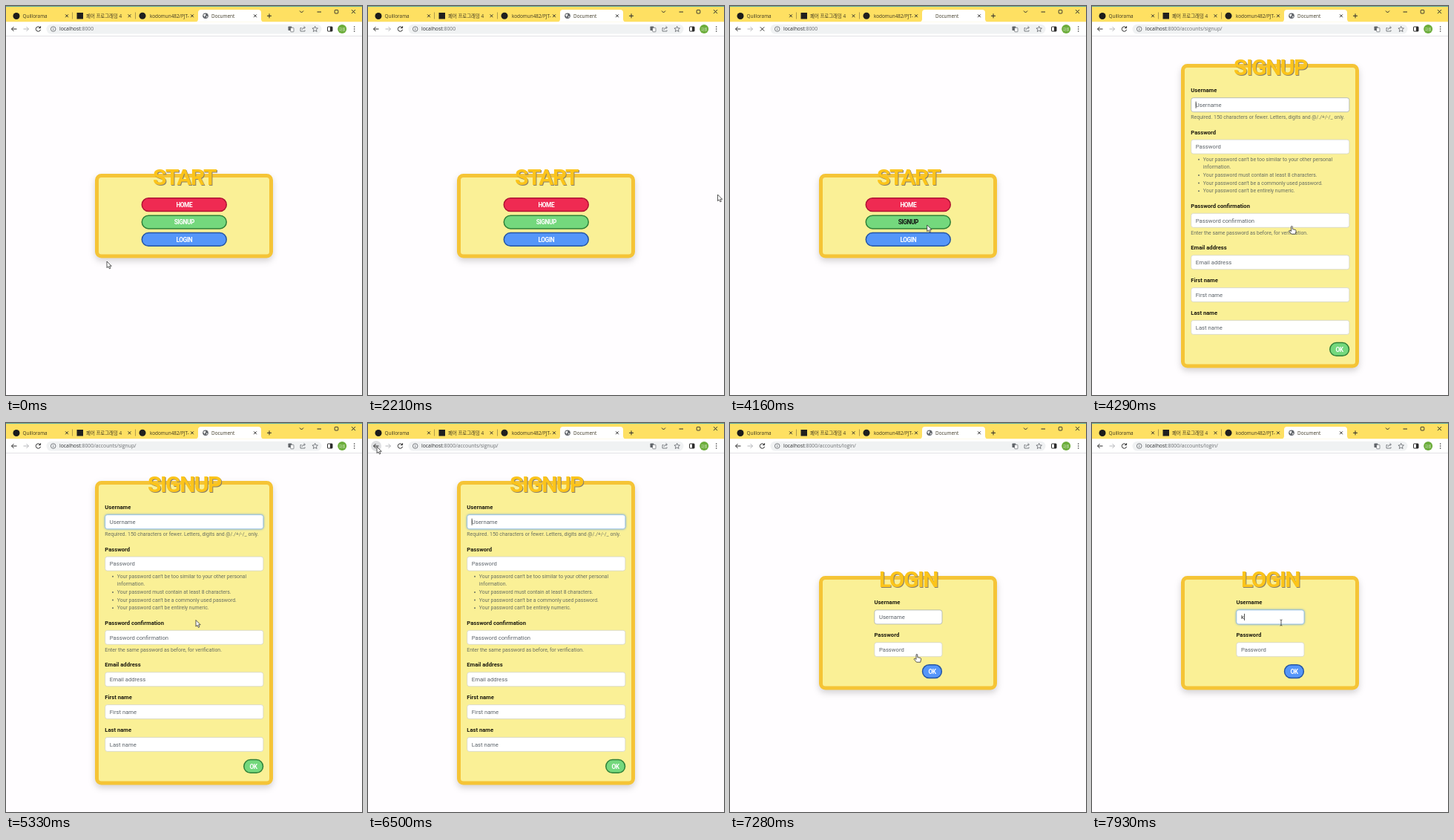
These frames come from a looping animation (480x524 px, 8000 ms). An HTML page:

```html
<!DOCTYPE html>
<html lang="en">
<head>
<meta charset="utf-8">
<title>Sign-up walkthrough</title>
<style>
  html, body { margin: 0; width: 100%; height: 100%; overflow: hidden; background: #fffdff; }
  svg { display: block; width: 100%; height: 100%; }
  text { font-family: Roboto, Inter, sans-serif; white-space: pre; }
  .tab { font: 6.4px "Open Sans", "Noto Sans CJK KR", "Noto Sans CJK", sans-serif; fill: #3b3520; }
  .url { font: 6.85px "Open Sans", sans-serif; fill: #6a6d70; }
  .url tspan { fill: #2a2c2e; }
  .title { font-size: 30px; font-weight: 700; letter-spacing: -1.5px; fill: #fcc41a; text-anchor: middle;
    filter: drop-shadow(1.6px 1.6px 0 #8b806b); }
  .button { font-size: 8.3px; font-weight: 700; letter-spacing: -.45px; fill: #fff; text-anchor: middle; }
  .label { font-size: 7.65px; font-weight: 700; fill: #1d1b10; }
  .field { font-size: 7.7px; fill: #5d646b; }
  .help { font-size: 6.92px; fill: #686f62; }
  .card { filter: drop-shadow(0 4px 4px rgba(0, 0, 0, .17)); }
  .line { fill: none; stroke: #2c2c2c; stroke-width: 1; }
  .thin { fill: none; stroke: #5f6368; stroke-width: .8; }
  .hover .button { fill: #111; }
</style>
</head>
<body>
<svg id="stage" viewBox="0 0 480 524" preserveAspectRatio="none"></svg>
<script>
const LOOP = 8000;
const stage = document.getElementById('stage');

const rect = (x, y, w, h, r, fill, extra = '') =>
  `<rect x="${x}" y="${y}" width="${w}" height="${h}" rx="${r}" fill="${fill}" ${extra}/>`;
const circle = (x, y, r, fill, extra = '') => `<circle cx="${x}" cy="${y}" r="${r}" fill="${fill}" ${extra}/>`;
const text = (cls, x, y, content) => `<text class="${cls}" x="${x}" y="${y}">${content}</text>`;
const path = (cls, d, extra = '') => `<path class="${cls}" d="${d}" ${extra}/>`;
const group = (id, content) => `<g id="${id}">${content}</g>`;
const cross = (x, y, r, cls = 'line') =>
  path(cls, `M${x - r} ${y - r}L${x + r} ${y + r}M${x + r} ${y - r}L${x - r} ${y + r}`);

const card = (top, height, title) =>
  rect(122.5, top + 2.5, 235, height - 5, 6, '#faf096', 'class="card" stroke="#f5c436" stroke-width="5"') +
  text('title', 240.5, top + 15, title);

const button = (id, x, y, w, label, fill, edge) => group(id,
  rect(x + .75, y + .75, w - 1.5, 17.8, 8.9, fill, `stroke="${edge}" stroke-width="1.5"`) +
  text('button', x + w / 2, y + 12.7, label));

const input = (x, mid, w, label, labelMid, id = '') =>
  text('label', x, labelMid + 2.7, label) +
  rect(x + .4, mid - 9.5, w - .8, 19, 3, '#fff', `stroke="#d3d5c6" stroke-width=".8" id="${id}Box"`) +
  `<text class="field" id="${id}Text" x="${x + 6.5}" y="${mid + 2.8}">${label}</text>`;

const caret = (id, x, mid) => rect(x, mid - 4.5, .8, 9, 0, '#222', `id="${id}"`);

const RED = ['#ef2a52', '#ad1433'], GREEN = ['#74d87d', '#2f8038'], BLUE = ['#5596f9', '#2455a3'];

const startPage = card(226, 113.5, 'START') +
  button('homeButton', 182.5, 258, 115.5, 'HOME', ...RED) +
  button('signupButton', 182.5, 281.4, 115.5, 'SIGNUP', ...GREEN) +
  button('loginButton', 182.5, 304.8, 115.5, 'LOGIN', ...BLUE);

const rules = [
  'Your password can’t be too similar to your other personal', 'information.',
  'Your password must contain at least 8 characters.',
  'Your password can’t be a commonly used password.',
  'Your password can’t be entirely numeric.'
];
const signupPage = card(78, 409.5, 'SIGNUP') +
  input(133.3, 133.2, 214, 'Username', 113.3, 'signupName') +
  text('help', 133.3, 152.3, 'Required. 150 characters or fewer. Letters, digits and @/./+/-/_ only.') +
  input(133.3, 189.6, 214, 'Password', 169.8) +
  rules.map((rule, i) => text('help', 149.8, 208.8 + i * 10.6, rule) +
    (i === 1 ? '' : circle(144, 206.8 + i * 10.6, 1, '#686f62'))).join('') +
  input(133.3, 288.8, 214, 'Password confirmation', 268.9) +
  text('help', 133.3, 307.9, 'Enter the same password as before, for verification.') +
  input(133.3, 345.3, 214, 'Email address', 325.4) +
  input(133.3, 389.1, 214, 'First name', 369.2) +
  input(133.3, 432.9, 214, 'Last name', 413) +
  button('', 320, 452.8, 27.3, 'OK', ...GREEN) + caret('signupCaret', 139.7, 133.2);

const loginPage = card(206, 153.5, 'LOGIN') +
  input(194.4, 261.4, 92, 'Username', 241.4, 'loginName') +
  input(194.4, 305.2, 92, 'Password', 285.3) +
  button('', 258.8, 325, 27.3, 'OK', ...BLUE) + caret('loginCaret', 200.8, 261.4);

const tabs =
  rect(0, 0, 480, 21.5, 0, '#fee062') + rect(0, 0, 480, 1, 0, '#56a5a5') +
  path('', 'M255 21.5q4 0 4-4V9q0-4 4-4h77q4 0 4 4v8.500q0 4 4 4z', 'fill="#fff"') +
  path('thin', 'M89.500 8.500v9M174.500 8.500v9', 'style="stroke:#9b8a45"') +
  circle(14, 13.5, 4.5, '#1b1b1b') + text('tab', 22.5, 15.6, 'Quillorama') +
  rect(95.5, 9, 8.5, 8.5, 0, '#1f1f1f') + text('tab', 108, 15.6, '페어 프로그래밍 4') +
  circle(184, 13.3, 4.5, '#1f1f1f') + text('tab', 194, 15.6, 'kodomun482/PJT-') +
  text('tab', 277, 15.6, 'Document') +
  [82, 166.5, 251, 336].map(x => cross(x, 13.3, 1.9)).join('') +
  group('globe', circle(269, 13.3, 3.8, '#5f6368') +
    path('', 'M266 12l2.500-1.500 1 1.500-1.500 2 .5 2zM270 13.500l2 .5-1.500 2z', 'fill="#fff"')) +
  path('line', 'M352 13.300h6M355 10.300v6M396 6.500l2.500 2.500 2.500-2.500M419.500 8h5.500') +
  rect(443.2, 5.4, 4.6, 4.6, .8, 'none', 'stroke="#2c2c2c" stroke-width=".9"') + cross(468.5, 7.6, 2.5);

const toolbar =
  rect(0, 21.5, 480, 18.5, 0, '#fff') + rect(0, 40, 480, .8, 0, '#dcdcdf') +
  circle(11, 31, 7, '#dedfe1', 'id="backHover"') +
  path('line', 'M14.500 31h-7M10.500 28l-3 3 3 3') +
  path('line', 'M23.500 31h7M27.500 28l3 3-3 3', 'id="forward"') +
  group('reload', path('line', 'M46 29a3.200 3.200 0 1 0 .6 2.800M46.600 27.200v2.500h-2.500')) +
  group('stop', cross(43.5, 31, 2.7)) +
  rect(54.5, 24.7, 371, 12.8, 6.4, '#f0f2f3') +
  circle(63.7, 31, 3.3, 'none', 'stroke="#5f6368" stroke-width=".8"') +
  path('thin', 'M63.700 30.500v2.200M63.700 29v.7') +
  '<text class="url" x="72" y="33.400"><tspan>localhost</tspan>:8000<tspan id="route" style="fill:#6a6d70"></tspan></text>' +
  rect(380.5, 27.5, 4.8, 5.5, .7, '#5f6368') +
  rect(383.7, 29.3, 4.3, 5.5, .7, '#fff', 'stroke="#5f6368" stroke-width=".7"') +
  path('thin', 'M398.500 29.500h-1.500v4.500h6v-1.500M399 32q.5-3 4-3M401.500 27.300l2 1.700-2 1.700') +
  path('thin', 'M416.700 27.300l1.100 2.500 2.700.2-2.100 1.800.7 2.700-2.400-1.400-2.400 1.400.7-2.700-2.100-1.800 2.700-.2z') +
  rect(433.5, 28, 6.5, 6, .6, 'none', 'stroke="#2c2c2c"') + rect(437, 28, 3, 6, 0, '#2c2c2c') +
  circle(453.2, 31, 6, '#6bad3a') +
  '<text x="453.200" y="32.700" text-anchor="middle" style="font:4.500px \'Noto Sans CJK KR\',sans-serif;fill:#e6f2dc">회원</text>' +
  [28, 31, 34].map(y => circle(469.7, y, .8, '#333')).join('');

const outline = 'fill="#fff" stroke="#222" stroke-width=".75" stroke-linejoin="round"';
const pointers =
  group('arrow', path('', 'M0 0V8.600L2 6.900 3.400 9.900 4.900 9.200 3.500 6.300H6.200Z', outline)) +
  group('hand', path('', 'M0 1q1-1.200 1.800 0v3.600l4 .9q1 .4.800 1.700l-.8 4H.5L-2.800 7.300q-.1-1.200 1.200-1L0 7.500Z', outline)) +
  group('beam', path('', 'M-1.500-4Q0-4 0-3Q0-4 1.500-4M0-3V3M-1.500 4Q0 4 0 3Q0 4 1.500 4',
    'fill="none" stroke="#333" stroke-width=".8"'));

stage.innerHTML = rect(0, 0, 480, 524, 0, '#fffdff') +
  group('start', startPage) + group('signup', signupPage) + group('login', loginPage) +
  tabs + toolbar + group('pointer', pointers);

const el = id => document.getElementById(id);
const show = (id, on) => { el(id).style.display = on ? '' : 'none'; };

// Pointer steps: time, x, y, shape
const moves = [
  [0, 136, 344, 'arrow'], [910, 318, 296, 'arrow'], [1040, 470.5, 256, 'arrow'],
  [2210, 471.5, 254, 'arrow'], [2340, 386, 273, 'arrow'], [2470, 304, 289, 'arrow'],
  [2860, 283, 293, 'hand'], [2990, 272, 296, 'hand'], [3250, 270, 296, 'hand'],
  [3640, 269, 295, 'hand'], [4160, 265.7, 295, 'arrow'], [4290, 268.5, 296, 'hand'],
  [4420, 264, 287, 'arrow'], [4550, 259, 273, 'arrow'], [4680, 256, 265.5, 'arrow'],
  [6370, 92, 112, 'arrow'], [6500, 12, 32, 'arrow'], [6630, 39.5, 58.5, 'arrow'],
  [6760, 105, 135, 'arrow'], [6890, 190, 240, 'arrow'], [7020, 247, 309, 'hand'],
  [7150, 250, 312, 'arrow'], [7280, 251, 311, 'hand'], [7410, 253, 289, 'arrow'],
  [7540, 255, 269, 'beam']
];
const caretFlips = [4290, 4680, 4940, 5330, 5720, 5980, 6370, 7280, 7670, 7930];

function focus(id, age) {
  const box = el(id + 'Box').style;
  const ready = age >= 130;
  box.stroke = ready ? '#8fbbe6' : '#a9b0ad';
  box.filter = ready ? 'drop-shadow(0 0 1.4px #6ea5dc)' : '';
}

function draw(t) {
  const page = t >= 4290 && t < 6630 ? 'signup' : t >= 7280 ? 'login' : 'start';
  const loading = t >= 4030 && t < 4290 || t >= 7150 && t < 7280;
  for (const id of ['start', 'signup', 'login']) show(id, id === page);
  el('route').textContent = page === 'start' ? '' : `/accounts/${page}/`;

  const [, x, y, shape] = moves.findLast(move => move[0] <= t);
  el('pointer').setAttribute('transform', `translate(${x} ${y})`);
  for (const id of ['arrow', 'hand', 'beam']) show(id, id === shape);

  show('globe', !loading);
  show('reload', !loading);
  show('stop', loading);
  show('backHover', t >= 6500 && t < 6760);
  el('forward').style.stroke = t >= 6630 && t < 7280 ? '#2c2c2c' : '#b5b7ba';
  el('signupButton').classList.toggle('hover', t >= 2860 && t < 4290);
  el('loginButton').classList.toggle('hover', t >= 7020 && t < 7280);

  focus('signupName', t - 4290);
  focus('loginName', t - 7280);
  const caretOn = caretFlips.filter(time => time <= t).length % 2 === 1;
  const typed = t >= 7930;
  show('signupCaret', caretOn);
  show('loginCaret', caretOn || typed);
  el('loginCaret').setAttribute('x', typed ? 205 : 200.8);
  el('loginNameText').textContent = typed ? 'k' : 'Username';
  el('loginNameText').style.fill = typed ? '#222' : '';
}

const began = performance.now();
function tick() {
  draw((performance.now() - began) % LOOP);
  requestAnimationFrame(tick);
}
tick();
</script>
</body>
</html>
```
